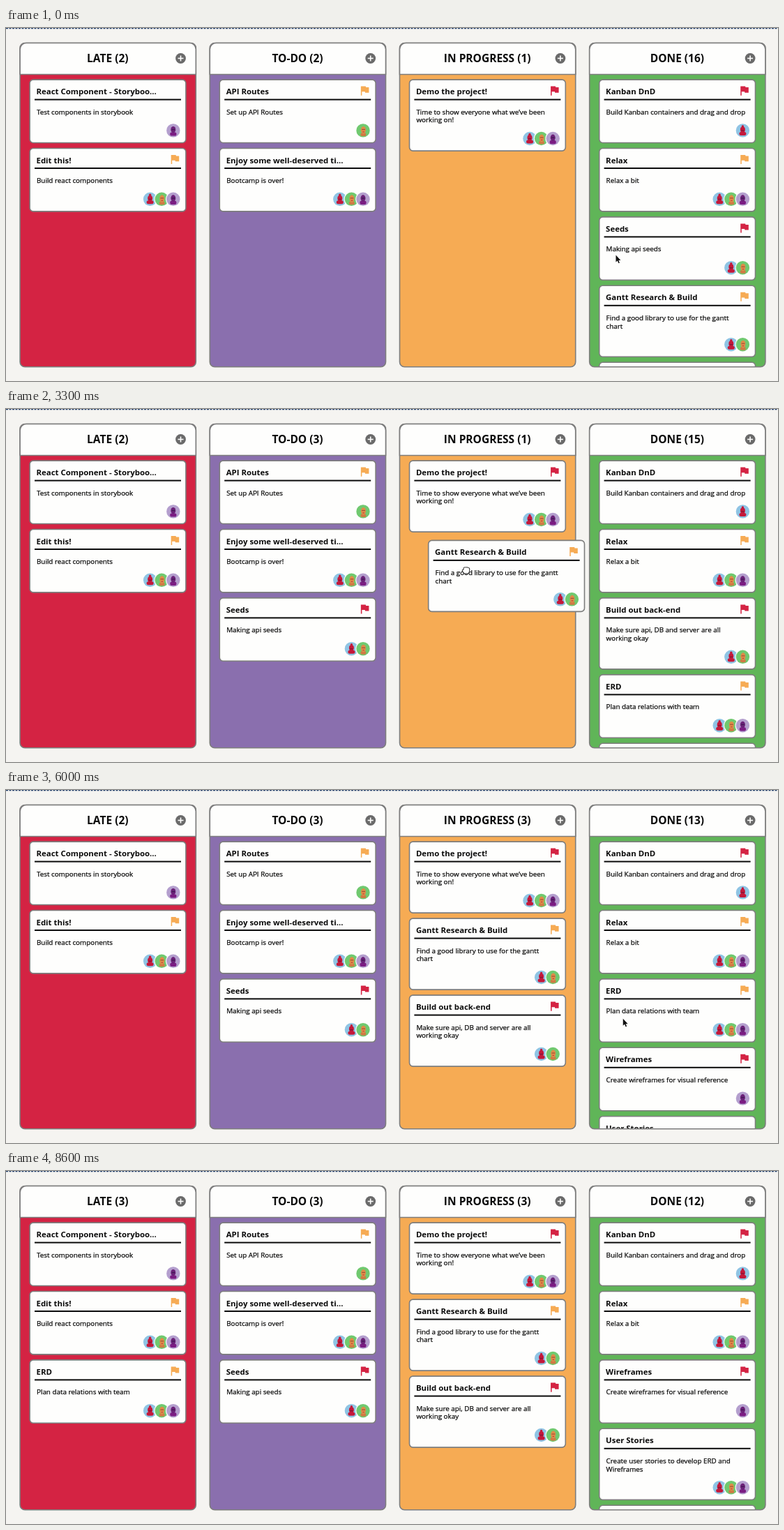
An HTML page with a canvas that plays this animation: 1107x506 px, repeating every 9 s.

```html
<!DOCTYPE html>
<html lang="en">
<head>
<meta charset="utf-8">
<title>Kanban board</title>
<style>
html, body { margin: 0; height: 100%; overflow: hidden; background: #f5f4f1; }
canvas { display: block; }
</style>
</head>
<body>
<canvas id="stage" width="1107" height="506"></canvas>
<script>
const ctx = document.getElementById('stage').getContext('2d');
const LOOP = 9000, PITCH = 272.2, COL_X = 19.3, CARD_X = 33.3, CARD_Y = 73.3, CARD_W = 225.4, GAP = 6.4;
const RED = '#d42343', ORANGE = '#f6ab54', GRAY = '#7d7d7d', WHITE = '#fefefd';
const FONT = '"Open Sans", "Noto Sans", sans-serif';

const card = (title, lines, people, flag) =>
  ({ title, lines: lines.split('|'), people, flag, h: lines.includes('|') ? 103.6 : 92 });

const columns = [
  { name: 'LATE', color: RED, cards: [
    card('React Component - Storyboo…', 'Test components in storybook', 'p'),
    card('Edit this!', 'Build react components', 'rgp', ORANGE)] },
  { name: 'TO-DO', color: '#8a6fae', cards: [
    card('API Routes', 'Set up API Routes', 'g', ORANGE),
    card('Enjoy some well-deserved ti…', 'Bootcamp is over!', 'rgp')] },
  { name: 'IN PROGRESS', color: ORANGE, cards: [
    card('Demo the project!', 'Time to show everyone what we’ve been|working on!', 'rgp', RED)] },
  { name: 'DONE', color: '#60b558', hidden: 7, cards: [
    card('Kanban DnD', 'Build Kanban containers and drag and drop', 'r', RED),
    card('Relax', 'Relax a bit', 'rgp', ORANGE),
    card('Seeds', 'Making api seeds', 'rg', RED),
    card('Gantt Research & Build', 'Find a good library to use for the gantt|chart', 'rg', ORANGE),
    card('Build out back-end', 'Make sure api, DB and server are all|working okay', 'rg', RED),
    card('ERD', 'Plan data relations with team', 'rgp', ORANGE),
    card('Wireframes', 'Create wireframes for visual reference', 'p', RED),
    card('User Stories', 'Create user stories to develop ERD and|Wireframes', 'rgp'),
    card('', '', '')] }
];

// Every drag takes the third card of DONE to the end of another column.
const SLOT = 2;
const drags = [
  { to: 1, press: 900, follow: 1200, release: 1800, land: 2100, commit: 2200, grab: [900, 319] },
  { to: 2, press: 2700, follow: 2900, release: 3300, land: 3500, commit: 3700, grab: [904, 313.5] },
  { to: 2, press: 4800, follow: 5000, release: 5300, land: 5600, commit: 5900, grab: [985, 322] },
  { to: 0, press: 6700, follow: 7000, release: 7700, land: 8000, commit: 8200, grab: [949.5, 314.8] }
];

// Pointer path: time, x, y
const path = [
  [0, 874, 325], [500, 900, 319], [800, 900, 319], [1600, 319, 350], [1700, 319, 350],
  [2100, 635, 332], [2400, 904, 314], [2500, 904, 314], [3300, 659, 231], [3500, 650, 236],
  [4100, 988, 335], [4200, 988, 335], [4300, 985, 329], [4700, 985, 329], [5200, 703, 371],
  [5600, 690, 364], [5700, 690, 364], [6100, 949, 315], [6400, 949, 315], [6900, 659, 318],
  [7300, 122, 313], [7400, 99, 312], [7500, 99, 312], [7700, 112, 314], [8000, 116, 300],
  [8100, 116, 300], [8400, 54, 12]
];
const grabbing = [[500, 1800], [2400, 3400], [4300, 5400], [6100, 7700]];

const flagShape = new Path2D('M14.4 6L14 4H5v17h2v-7h5.6l.4 2h7V6z');
const arrowShape = new Path2D('M.5 .5V10.5L2.8 8.6 4.4 12.2 5.9 11.5 4.4 8H7.4z');
const handShape = new Path2D('M-3-3q1.3-2 2.5-.8 1.4-1 2.4 0 1.4-.8 2.2.4 1.6-.2 1.6 1.4v3.3L4.2 5h-6l-3-4q-.8-1.8 1.8-1.5z');

const clamp = v => Math.max(0, Math.min(1, v));
const mix = (a, b, k) => a + (b - a) * k;
const easeOut = k => 1 - (1 - k) ** 3;

function pointer(t) {
  const i = path.findIndex(p => p[0] > t);
  if (i < 0) return path.at(-1).slice(1);
  const [a, b] = [path[i - 1], path[i]], k = (t - a[0]) / (b[0] - a[0]);
  return [mix(a[1], b[1], k), mix(a[2], b[2], k)];
}

function box(x, y, w, h, r, fill, stroke) {
  ctx.beginPath();
  ctx.roundRect(x, y, w, h, r);
  ctx.fillStyle = fill;
  ctx.fill();
  if (!stroke) return;
  ctx.strokeStyle = stroke;
  ctx.lineWidth = 1.6;
  ctx.stroke();
}

function disc(x, y, rx, color, ry = rx) {
  ctx.fillStyle = color;
  ctx.beginPath();
  ctx.ellipse(x, y, rx, ry, 0, 0, 7);
  ctx.fill();
}

function rect(x, y, w, h, color) {
  ctx.fillStyle = color;
  ctx.fillRect(x, y, w, h);
}

function text(s, x, y, font, align = 'left', weight = 0) {
  ctx.font = font + ' ' + FONT;
  ctx.textAlign = align;
  ctx.fillStyle = ctx.strokeStyle = '#0b0b0b';
  ctx.fillText(s, x, y);
  if (!weight) return;
  ctx.lineWidth = weight;
  ctx.strokeText(s, x, y);
}

function at(x, y, draw) {
  ctx.save();
  ctx.translate(x, y);
  draw();
  ctx.restore();
}

const faces = {
  r() {
    disc(0, 0, 9.7, '#8fc4e4');
    disc(0, -6, 1.7, '#c4183a');
    disc(0, -1.2, 3.5, '#c4183a', 4.2);
    box(-5, 2, 10, 5, 2.5, '#c4183a');
    rect(-2, -.6, 4, 1.4, '#7c1838');
  },
  g() {
    disc(0, 0, 9.7, '#70c96f');
    box(-3.6, 3.5, 8, 4.5, 2, '#cf7a44');
    disc(.5, -.6, 3.5, '#df8a48', 5.4);
    rect(-1.8, -2, 4.8, 1.1, '#9a5038');
    rect(-.5, 1.6, 2.2, .9, '#b52f3c');
  },
  p() {
    disc(0, 0, 9.7, '#b49fce');
    box(-4.6, 2.5, 9.2, 5.2, 2.2, '#7b1c83');
    disc(0, -1.2, 3.5, '#6b2178', 4.8);
    rect(-2, -2, 4.2, 1.3, '#3d1a52');
  }
};

function drawCard(c, x, y) {
  at(x, y, () => {
    box(.8, .8, CARD_W - 1.6, c.h - 1.6, 5, WHITE, GRAY);
    text(c.title, 10.2, 21.8, 'bold 11.43px');
    rect(7.7, 28.3, 210, 2, '#0b0b0b');
    c.lines.forEach((s, i) => text(s, 10.7, 50.3 + i * 11.8, '9.83px', 'left', .25));
    if (c.flag) at(199.5, 7.2, () => {
      ctx.scale(.77, .77);
      ctx.fillStyle = c.flag;
      ctx.fill(flagShape);
    });
    [...c.people].forEach((p, i) => at(206.5 - (c.people.length - 1 - i) * 16.6, c.h - 18.4, () => {
      disc(0, 0, 10.8, WHITE);
      faces[p]();
    }));
  });
}

function drawColumn(col, x, cards, tops) {
  box(x + .8, 21.5, 252.2, 464.3, 7, col.color, GRAY);
  ctx.save();
  ctx.beginPath();
  ctx.rect(x, 67, 254, 418);
  ctx.clip();
  cards.forEach((c, i) => tops[i] !== null && drawCard(c, x + CARD_X - COL_X, tops[i]));
  ctx.restore();
  box(x + .8, 21.5, 252.2, 45, [9, 9, 0, 0], WHITE, GRAY);
  text(`${col.name} (${cards.length + (col.hidden || 0)})`, x + 126.5, 49, 'bold 15.5px', 'center');
  disc(x + 231.2, 43.5, 7.4, '#6a6a6a');
  rect(x + 227.2, 42.7, 8, 1.6, WHITE);
  rect(x + 230.4, 39.5, 1.6, 8, WHITE);
}

function drawPointer(t) {
  if (t >= 8600) return;
  const hand = grabbing.some(([a, b]) => t >= a && t < b);
  at(...pointer(t), () => {
    ctx.lineJoin = 'round';
    ctx.lineWidth = hand ? 1 : 1.4;
    ctx.strokeStyle = hand ? '#222' : WHITE;
    ctx.fillStyle = hand ? WHITE : '#111';
    const shape = hand ? handShape : arrowShape;
    if (hand) ctx.fill(shape);
    ctx.stroke(shape);
    if (!hand) ctx.fill(shape);
  });
}

function draw(t) {
  const lists = columns.map(c => c.cards.slice());
  const done = lists[3];
  for (const d of drags) if (t >= d.commit) lists[d.to].push(done.splice(SLOT, 1)[0]);
  const drag = drags.find(d => t >= d.press && t < d.commit);

  rect(0, 0, 1107, 506, '#f5f4f1');
  ctx.strokeStyle = '#1d3a66';
  ctx.lineWidth = 1.4;
  ctx.setLineDash([3, 1.5]);
  ctx.beginPath();
  ctx.moveTo(0, .6);
  ctx.lineTo(1107, .6);
  ctx.stroke();
  ctx.setLineDash([]);

  const ends = [];
  columns.forEach((col, n) => {
    let y = CARD_Y;
    const tops = lists[n].map((c, i) => {
      const top = y;
      y += c.h + GAP;
      if (n !== 3 || !drag || i < SLOT) return top;
      if (i === SLOT) return null;
      const closed = clamp((t - drag.follow) / 200);
      return top + mix(GAP, -done[SLOT].h - GAP, easeOut(closed));
    });
    ends.push(y);
    drawColumn(col, COL_X + n * PITCH, lists[n], tops);
  });

  if (drag) {
    let x = CARD_X + 3 * PITCH, y = CARD_Y + 2 * (92 + GAP);
    if (t >= drag.follow) {
      const [px, py] = pointer(Math.min(t, drag.release));
      const k = easeOut(clamp((t - drag.release) / (drag.land - drag.release)));
      x = mix(x + px - drag.grab[0], CARD_X + drag.to * PITCH, k);
      y = mix(y + py - drag.grab[1], ends[drag.to] + GAP, k);
    }
    drawCard(done[SLOT], x, y);
  }
  drawPointer(t);
}

// The board is repainted ten times a second.
function tick(now) {
  draw(Math.floor(now % LOOP / 100) * 100);
  requestAnimationFrame(tick);
}
draw(0);
requestAnimationFrame(tick);
</script>
</body>
</html>
```
